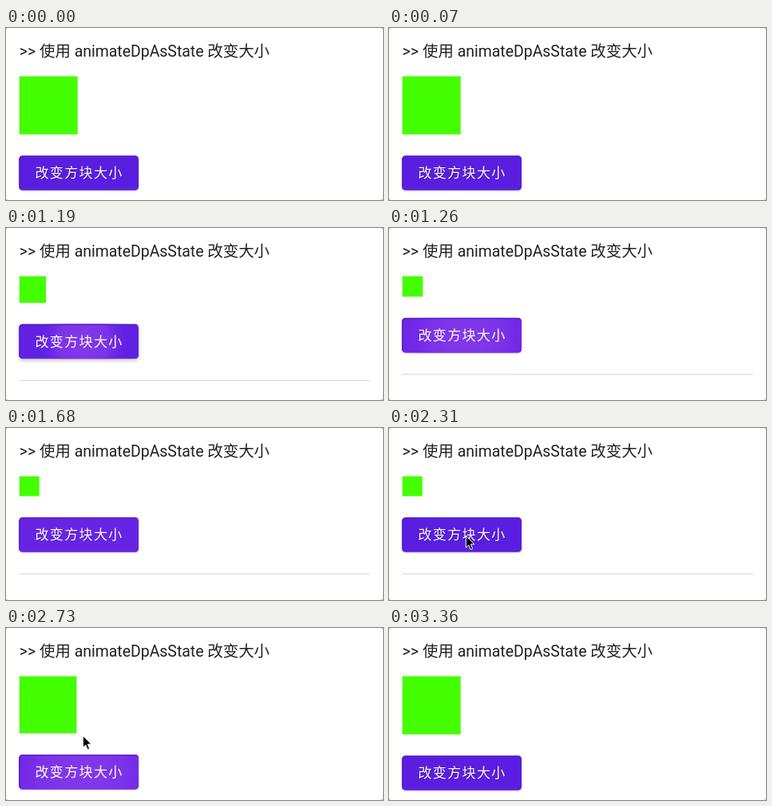
An HTML page for the animation above (3710 ms loop, 472 by 216 pixels).

```html
<!DOCTYPE html>
<html lang="zh">
<head>
<meta charset="utf-8">
<title>animateDpAsState</title>
<style>
  html, body { margin: 0; width: 100%; height: 100%; overflow: hidden; background: #fff; }
  svg { display: block; width: 472px; height: 216px; }
  text { font-family: Roboto, "Noto Sans CJK SC", "Noto Sans CJK", sans-serif; white-space: pre; }
</style>
</head>
<body>
<svg viewBox="0 0 472 216">
  <defs>
    <radialGradient id="glow" gradientUnits="userSpaceOnUse" cx="97" cy="22" r="40">
      <stop offset="0" stop-color="#8338ea"/>
      <stop offset=".6" stop-color="#7c33e8"/>
      <stop offset="1" stop-color="#7026e8" stop-opacity="0"/>
    </radialGradient>
    <clipPath id="buttonClip"><rect x="16.3" width="149.7" height="43.6" rx="4.5"/></clipPath>
    <filter id="soft" x="-10%" y="-30%" width="120%" height="160%">
      <feGaussianBlur id="blur" stdDeviation="1.5"/>
    </filter>
    <filter id="edge" x="-20%" y="-20%" width="140%" height="140%" color-interpolation-filters="sRGB">
      <feGaussianBlur stdDeviation=".6"/>
    </filter>
  </defs>
  <rect width="472" height="216" fill="#aaa"/>
  <rect width="472" height="216" rx="3" fill="#fff"/>
  <text x="16.8" y="36" font-size="19.45" fill="#202020">&gt;&gt; 使用 animateDpAsState 改变大小</text>
  <rect id="square" x="16.7" y="60.6" fill="#44ff00" filter="url(#edge)"/>
  <g id="button">
    <rect id="shadow" x="16.3" width="149.7" height="43.6" rx="4.5" filter="url(#soft)"/>
    <g clip-path="url(#buttonClip)">
      <rect x="16" width="151" height="44" fill="#5a1ee0"/>
      <rect id="tint" x="16" width="151" height="44" fill="#762ae8"/>
      <circle id="ripple" cx="97" cy="22" fill="url(#glow)"/>
      <path d="M17 44V5q0-4.3 4.5-4.3H166" fill="none" stroke="#4512b4" stroke-width="1.4" stroke-opacity=".7"/>
    </g>
    <g font-size="17" letter-spacing="1.35">
      <text id="textShade" x="37.2" y="29" fill="#30108a">改变方块大小</text>
      <text x="36.5" y="28.2" fill="#fff">改变方块大小</text>
    </g>
  </g>
  <rect id="divider" x="16" width="440" height="1.2" fill="#dcdcdc"/>
  <path id="cursor" d="M96.3 135.2v15l3.4-3.2 2.5 5.6 2.5-1.1-2.5-5.5h4.6z" fill="#000" stroke="#fff" stroke-width="1"/>
</svg>
<script>
const LOOP = 3710, STEP = 70, LAST = 3360;
const SMALL = 25, LARGE = 73;
const presses = [
  { down: 1115, start: 1118, rate: 0.044 },
  { down: 2550, start: 2573, rate: 0.035 }
];

const el = id => document.getElementById(id);
const set = (id, attrs) => {
  for (const key in attrs) el(id).setAttribute(key, attrs[key]);
};
const clamp = v => Math.max(0, Math.min(1, v));

// Critically damped spring, 0 to 1
function spring(t, { start, rate }) {
  const x = Math.max(0, t - start) * rate;
  return 1 - (1 + x) * Math.exp(-x);
}

function draw(t) {
  const [shrink, grow] = presses;
  const progress = 1 - spring(t, shrink) + spring(t, grow);
  const size = SMALL + (LARGE - SMALL) * progress;
  const top = 87.2 + size;

  const press = t < grow.down ? shrink : grow;
  const age = t - press.down;
  const active = age >= 0;
  const spread = active ? clamp(age / 190) : 0;
  const fade = active ? clamp((835 - age) / 560) : 0;
  const lift = active ? clamp(1 - Math.abs(age - 45) / 90) : 0;

  set("square", { width: size, height: size });
  set("button", { transform: `translate(0 ${top})` });
  set("divider", { y: top + 70.3 });
  set("shadow", { y: 0.8 + lift * 2, "fill-opacity": 0.28 - lift * 0.06 });
  set("blur", { stdDeviation: 1.2 + lift * 2 });
  set("tint", { opacity: fade * clamp((spread - 0.25) / 0.6) });
  set("glow", { r: 30 + 60 * spread });
  set("ripple", { r: 30 + 60 * spread, opacity: fade * clamp((430 - age) / 200) });
  set("textShade", { opacity: 0.65 * (1 - fade) });
  set("cursor", { visibility: t >= 2310 && t < 2940 ? "visible" : "hidden" });
}

function tick() {
  const t = performance.now() % LOOP;
  draw(Math.min(LAST, Math.floor(t / STEP) * STEP));
  requestAnimationFrame(tick);
}
tick();
</script>
</body>
</html>
```
